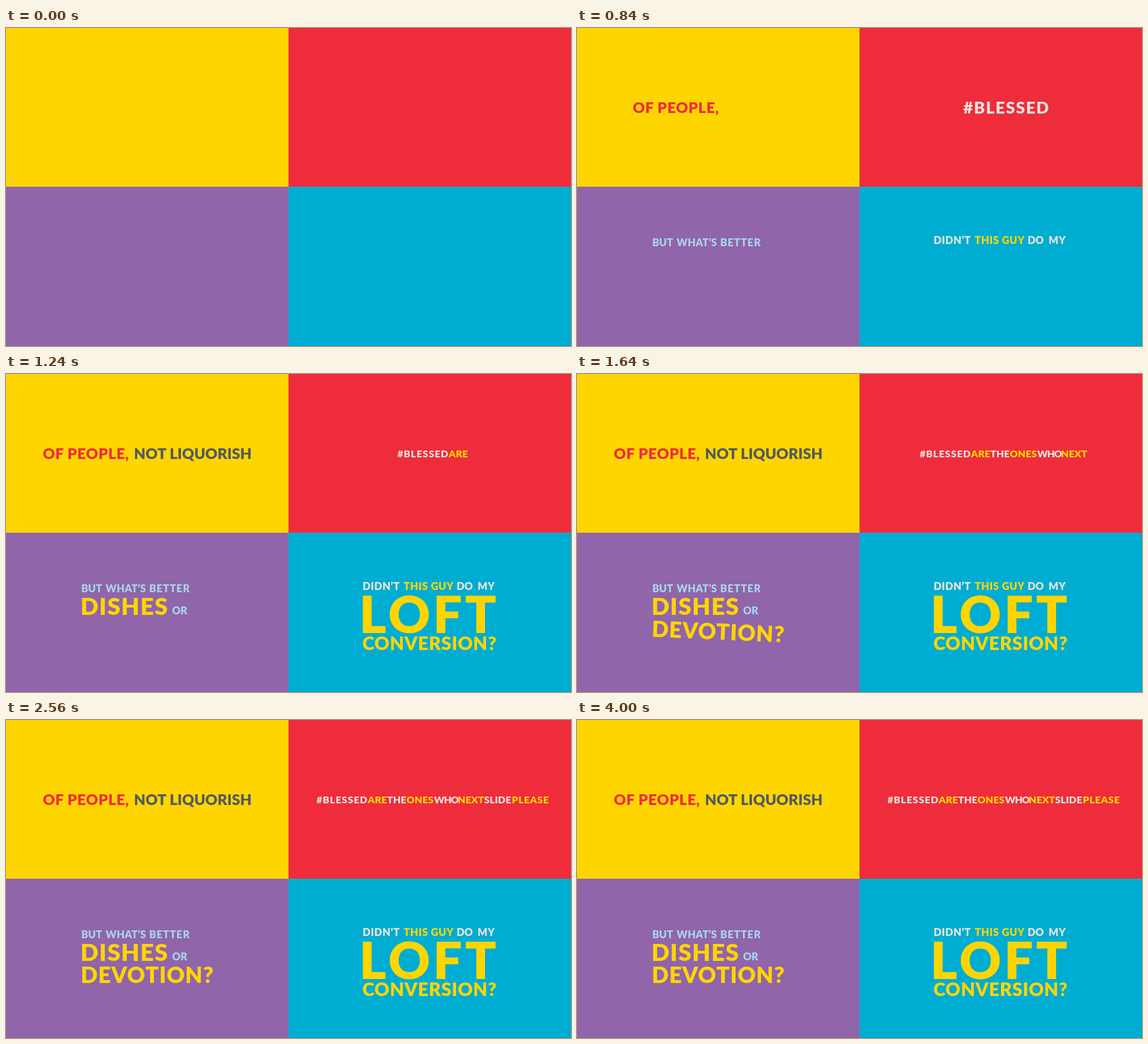
Write an HTML page that moves like this. It is 998 by 561 pixels and loops after 4040 ms.

```html
<!DOCTYPE html>
<html lang="en">
<head>
<meta charset="utf-8">
<title>Four cards</title>
<style>
  html, body { margin: 0; width: 100%; height: 100%; overflow: hidden; }
  svg { display: block; width: 998px; height: 561px; font: 900 18.1px Lato, sans-serif; }
  .yellow { fill: #ffd500; }
  .red { fill: #ef2c3b; }
  .purple { fill: #9065aa; }
  .blue { fill: #00add2; }
  .slate { fill: #535a60; }
  .pale { fill: #ebe3da; }
  .sky { fill: #a9d3ea; }
  #people { font-size: 26.3px; }
  #tags { font-size: 17.3px; letter-spacing: .2px; }
</style>
</head>
<body>
<svg viewBox="0 0 998 561">
  <rect class="yellow" width="499" height="280"/>
  <rect class="red" x="499" width="499" height="280"/>
  <rect class="purple" y="280" width="499" height="281"/>
  <rect class="blue" x="499" y="280" width="499" height="281"/>

  <g id="people">
    <text id="of" class="red" x="65" y="150" letter-spacing=".6" data-at="240">OF PEOPLE,</text>
    <text class="slate" x="226" y="150" data-at="920">NOT</text>
    <text class="slate" x="289" y="150" data-at="1200">LIQUORISH</text>
  </g>

  <text id="hashtag" class="yellow" x="749" y="161" font-size="56.5" letter-spacing="2.7" text-anchor="middle" data-at="320" data-to="840">HASHTAG</text>
  <g id="tags">
    <text class="pale" x="548.5" y="147" letter-spacing="1" data-at="840">#BLESSED</text>
    <text class="yellow" x="639" y="147" data-at="1160">ARE</text>
    <text class="pale" x="673" y="147" data-at="1280">THE</text>
    <text class="yellow" x="707.5" y="147" data-at="1400">ONES</text>
    <text class="pale" x="756" y="147" letter-spacing="-1" data-at="1480">WHO</text>
    <text class="yellow" x="798" y="147" data-at="1600">NEXT</text>
    <text class="pale" x="844.5" y="147" data-at="1880">SLIDE</text>
    <text class="yellow" x="893.5" y="147" letter-spacing=".7" data-at="2040">PLEASE</text>
  </g>

  <g class="sky">
    <text x="133" y="385" data-at="240">BUT</text>
    <text x="176" y="385" letter-spacing=".2" data-at="400">WHAT’S</text>
    <text x="253" y="385" letter-spacing=".9" data-at="720">BETTER</text>
    <text x="293.5" y="424" data-at="1240">OR</text>
  </g>
  <g class="yellow">
    <text id="dishes" x="131.5" y="424.5" font-size="41.8" letter-spacing="1.3" data-at="880">DISHES</text>
    <text id="devotion" x="132" y="463.5" font-size="39.2" letter-spacing=".9" data-at="1400">DEVOTION?</text>
  </g>

  <g class="pale">
    <text x="630" y="381" letter-spacing=".6" data-at="240">DIDN’T</text>
    <text x="796" y="381" data-at="760">DO</text>
    <text x="833" y="381" letter-spacing=".6" data-at="840">MY</text>
  </g>
  <g class="yellow">
    <text x="702.5" y="381" letter-spacing=".6" data-at="440">THIS GUY</text>
    <text x="624" y="456.5" font-size="91" letter-spacing="5" data-at="920">LOFT</text>
    <text id="conversion" x="629.5" y="487" font-size="32.5" letter-spacing=".6" data-at="1120">CONVERSION?</text>
  </g>
</svg>
<script>
  const LOOP = 4040;
  const words = [...document.querySelectorAll('[data-at]')];
  const byId = id => document.getElementById(id);
  const place = (id, value) => byId(id).setAttribute('transform', value);

  // Eased progress from 0 to 1 between two times
  const ease = (t, from, to) => {
    const p = Math.min(1, Math.max(0, (t - from) / (to - from)));
    return p * p * (3 - 2 * p);
  };
  const scaleAt = (x, y, s) => `translate(${x} ${y}) scale(${s}) translate(${-x} ${-y})`;

  // Horizontal offset that keeps the growing hashtag centred
  const shifts = [[840, 163], [1160, 143], [1280, 125.5], [1400, 101.5],
                  [1480, 80], [1600, 57], [1880, 32.5], [2040, 0]];

  function draw(t) {
    for (const w of words) {
      const on = t >= +w.dataset.at && t < +(w.dataset.to || LOOP);
      w.setAttribute('visibility', on ? 'visible' : 'hidden');
    }
    place('of', `translate(${114 * (1 - ease(t, 700, 920))} 0)`);
    place('hashtag', scaleAt(748.5, 141, 0.3 + 0.7 * ease(t, 320, 480)));

    const shift = shifts.reduce((s, [at, x]) => t >= at ? x : s, 163);
    const size = 1 + 0.68 * (1 - ease(t, 1080, 1200));
    place('tags', `translate(${shift} 0) ` + scaleAt(754 - shift, 140.5, size));

    place('dishes', scaleAt(134, 424.5, 0.4 + 0.6 * ease(t, 880, 1080)));
    place('conversion', `translate(0 ${9 * (1 - ease(t, 1120, 1240))})`);

    // Damped swing from the left edge
    const s = Math.max(0, t - 1400);
    const swing = 5 * Math.exp(-s / 500) * Math.cos(s / 1200 * Math.PI) * (1 - ease(t, 1700, 2200));
    place('devotion', `rotate(${swing} 134 450)`);
  }

  function tick() {
    draw(performance.now() % LOOP);
    requestAnimationFrame(tick);
  }
  tick();
</script>
</body>
</html>
```
